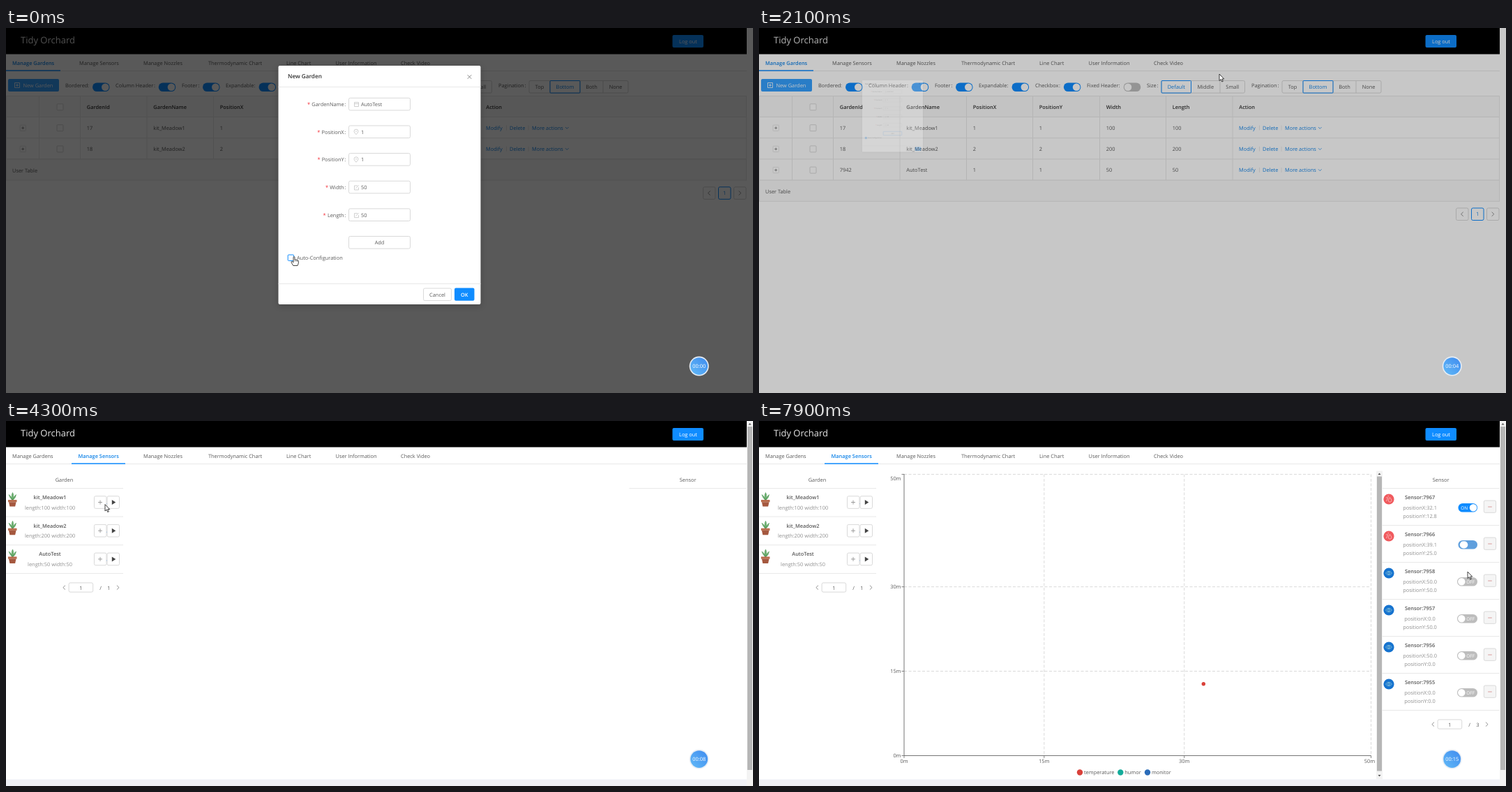
An HTML page for the animation above (8 s loop, 1071 by 523 pixels).

```html
<!DOCTYPE html>
<html lang="en">
<head>
<meta charset="utf-8">
<title>Garden console</title>
<style>
html, body { margin: 0; width: 100%; height: 100%; overflow: hidden; background: #fff; }
svg { display: block; width: 100vw; height: 100vh; }
text { font-family: 'Open Sans', 'Noto Sans', sans-serif; font-size: 7.4px; fill: #5a5a5a; white-space: pre; text-rendering: geometricPrecision; }
.b { font-weight: 600; }
.dark { fill: #333; }
.dim { fill: #8f8f8f; }
.blue { fill: #1284e8; }
.white { fill: #fff; }
.red { fill: #f5222d; }
.mid { text-anchor: middle; }
.end { text-anchor: end; }
</style>
</head>
<body>
<svg id="stage" viewBox="0 0 1071 523" preserveAspectRatio="none"></svg>
<script>
const LOOP = 8000, STEP = 100;
const BLUE = '#0f8cff', LINE = '#e8e8e8', EDGE = '#d9d9d9', HEAD = '#fafafa';
const GARDENS = [['17', 'kit_Meadow1', 1, 100], ['18', 'kit_Meadow2', 2, 200], ['7942', 'AutoTest', 1, 50]];

// markup helpers
const text = (x, y, s, cls = '', more = '') => `<text x="${x}" y="${y}" class="${cls}" ${more}>${s}</text>`;
const rect = (x, y, w, h, fill, stroke = 'none', r = 0, more = '') =>
  `<rect x="${x}" y="${y}" width="${w}" height="${h}" rx="${r}" fill="${fill}" stroke="${stroke}" ${more}/>`;
const path = (d, stroke, w = 0.8, fill = 'none', more = '') =>
  `<path d="${d}" stroke="${stroke}" stroke-width="${w}" fill="${fill}" ${more}/>`;
const hline = (x, y, x2, c = LINE) => path(`M${x} ${y}H${x2}`, c, 1);
const vline = (x, y, y2, c = LINE) => path(`M${x} ${y}V${y2}`, c, 1);
const disc = (x, y, r, fill, more = '') => `<circle cx="${x}" cy="${y}" r="${r}" fill="${fill}" ${more}/>`;
const box = (x, y, w, h, c = EDGE, r = 2, fill = '#fff') => rect(x, y, w, h, fill, c, r);
const group = (id, s, more = '') => `<g id="${id}" ${more}>${s}</g>`;
const at = (x, y, s) => `<g transform="translate(${x} ${y})">${s}</g>`;
const left = (x, y, c = '#777') => path(`M${x + 1.7} ${y - 3}l-3.2 3l3.2 3`, c);
const right = (x, y, c = '#777') => path(`M${x - 1.7} ${y - 3}l3.2 3l-3.2 3`, c);

function toggle(x, y, on) {
  return rect(x, y, 24.6, 12.6, on ? BLUE : '#bdbdbd', 'none', 6.3) + disc(on ? x + 18.3 : x + 6.3, y + 6.3, 5.3, '#fff');
}

function header() {
  return rect(0, 0, 1062, 37.5, '#000') + text(21, 21.5, 'Tidy Orchard', '', 'style="font-size:13px;fill:#e6e6e6"') +
    rect(955.5, 10, 44.5, 18, BLUE, 'none', 2) + text(978, 22, 'Log out', 'mid white');
}

function tabs(active) {
  const names = ['Manage Gardens', 'Manage Sensors', 'Manage Nozzles', 'Thermodynamic Chart', 'Line Chart', 'User Information', 'Check Video'];
  const xs = [9, 105, 197, 290, 402, 472.5, 566];
  const ink = active ? [94, 77] : [0, 78];
  return hline(0, 61.5, 1062) + rect(ink[0], 60.3, ink[1], 1.5, BLUE) + names.map((n, i) => i === active
    ? text(i ? 103.5 : xs[i], 53, n, 'b blue')
    : text(xs[i], 53, n, '', `id="tab${active}${i}"`)).join('');
}

function scrollbar(x, top, bottom, thumb) {
  return rect(x, top, 9, bottom - top, '#f3f3f3') + rect(x + 1, top + 8, 7, thumb, '#b6b6b6') +
    path(`M${x + 2.5} ${top + 5.5}h4l-2 -2.4z`, 'none', 0, '#555');
}

function toolbar() {
  const labels = [['Bordered', 85, 117, 124], ['Column Header', 157, 212, 218.7], ['Footer', 252, 275.5, 282],
    ['Expandable', 315, 355.5, 362.5], ['Checkbox', 396, 430, 436.8], ['Fixed Header', 470, 515.5, 522.7],
    ['Size', 556, 570.5], ['Pagination', 706, 743.5]];
  let s = rect(3, 73, 73, 18, '#34a0ff', 'none', 2) + path('M12.5 78.5h7v7h-7zM16 80v4M14 82h4', '#fff') + text(24.5, 85, 'New Garden', 'white');
  for (const [name, x, colon, sw] of labels)
    s += text(x, 85, name) + text(colon, 85, ':') + (sw ? toggle(sw, 78.4, sw < 500) : '');
  const radios = (xs, names, pick) => {
    s += box(xs[0], 75.5, xs.at(-1) - xs[0], 17.6);
    names.forEach((n, i) => {
      if (i) s += vline(xs[i], 75.5, 93.1, EDGE);
      s += text((xs[i] + xs[i + 1]) / 2, 87.3, n, 'mid' + (i === pick ? ' blue' : ''));
    });
    s += box(xs[pick], 75.5, xs[pick + 1] - xs[pick], 17.6, BLUE, 1, 'none');
  };
  radios([577, 619.5, 661, 696.5], ['Default', 'Middle', 'Small'], 0);
  radios([750, 780, 823, 856, 892], ['Top', 'Bottom', 'Both', 'None'], 1);
  return s;
}

const COLS = [0.5, 47.5, 106.5, 202, 297.5, 392.5, 488.5, 583.5, 679, 1061.5];

function tableRow(g, i) {
  const y = 127.5 + i * 30.2, base = y + 18.3;
  const cells = [g[0], g[1], g[2], g[2], g[3], g[3]];
  return COLS.map(x => vline(x, y, y + 30.2)).join('') + hline(0, y + 30.2, 1062) +
    box(20, y + 11.5, 8.4, 8.4, LINE, 1) + path(`M22.3 ${y + 15.7}h3.8m-1.9 -1.9v3.8`, '#666', 0.7) +
    box(73, y + 11.2, 9, 9, EDGE, 1) +
    cells.map((c, k) => text(COLS[k + 2] + 9.3, base, c)).join('') +
    text(688, base, 'Modify', 'blue') + vline(717.5, y + 12, y + 19) + text(722, base, 'Delete', 'blue') +
    vline(749, y + 12, y + 19) + text(754, base, 'More actions', 'blue') + path(`M802 ${y + 14.5}l2.3 2.3l2.3 -2.3`, '#1284e8', 0.7);
}

function gardensPage() {
  const heads = ['GardenId', 'GardenName', 'PositionX', 'PositionY', 'Width', 'Length', 'Action'];
  const foot = rect(0.5, 187.9, 1061, 30.2, HEAD, LINE) + text(9, 206.5, 'User Table') +
    [999.5, 1021.5, 1043.5].map((x, i) => box(x, 227.8, 17.5, 17.5, i === 1 ? BLUE : EDGE)).join('') +
    left(1008, 236.5) + text(1030.2, 239.3, '1', 'mid blue') + right(1052.3, 236.5);
  return tabs(0) + toolbar() + rect(0.5, 97.5, 1061, 30, HEAD, LINE) + COLS.map(x => vline(x, 97.5, 127.5)).join('') +
    box(73, 108.8, 9, 9, EDGE, 1) + heads.map((h, i) => text(COLS[i + 2] + 9.3, 115.6, h, 'b dark')).join('') +
    tableRow(GARDENS[0], 0) + tableRow(GARDENS[1], 1) + group('newRow', tableRow(GARDENS[2], 2)) + group('foot', foot);
}

function pager(x, y, page, total, id) {
  return left(x, y) + box(x + 6.8, y - 6.7, 34.6, 13.2) + text(x + 24, y + 3.2, page, 'mid', `id="${id}"`) +
    text(x + 52.3, y + 3.2, '/', 'mid') + text(x + 64, y + 3.2, total, 'mid') + group(id + 'Next', right(x + 77.3, y));
}

function gardenItem(g, i) {
  const leaf = path('M6 10Q2 6 1 2Q5 4 6 10Q4 3 6.500 -1Q9 3 6.500 10Q8 4 11.500 2Q11 7 6.500 10z', '#4b8f52', 0.5, '#6bb26e');
  const pot = rect(0, 9.5, 12.5, 3.2, '#b96d4e') + path('M1 12.700h10.500l-1.400 6.300h-7.700z', 'none', 0, '#a5583f');
  return at(0, i * 40.7, at(3, 103.5, leaf + pot) + text(63, 112, g[1], 'b mid') +
    text(63, 126.6, `length:${g[3]} width:${g[3]}`, 'mid dim') +
    box(126.5, 107.7, 17.5, 17.6) + path('M132 116.500h6m-3 -3v6', '#888') + disc(144.5, 118.5, 0.6, '#6aa9ea') +
    rect(145, 107.7, 17.5, 17.6, '#fff', EDGE, 2, `id="play${i}"`) +
    path('M151.800 113l5.500 3.500l-5.500 3.500z', 'none', 0, '#444', `id="arrow${i}"`) + hline(0, 137, 168));
}

function chart() {
  const dash = 'stroke-dasharray="4 2.5"';
  const xs = [208, 408.8, 609.7, 877.5], ys = [479.5, 358.5, 237.6, 76.4], marks = ['0m', '15m', '30m', '50m'];
  let s = '';
  for (let i = 0; i < 4; i++) {
    if (i) s += path(`M208 ${ys[i]}H877.5M${xs[i]} 76.4V479.5`, '#d0d0d0', 0.8, 'none', dash);
    s += path(`M208 ${ys[i]}h-3.5M${xs[i]} 479.5v3.500`, '#666') +
      text(203.5, i === 3 ? 85.3 : ys[i] + 2.7, marks[i], 'end') + text(i === 3 ? 875.5 : xs[i], 489.8, marks[i], 'mid');
  }
  s += path('M208 76V479.500H877.500', '#666', 0.9);
  [['temperature', 460, '#d9413a'], ['humor', 518.3, '#13ab9a'], ['monitor', 557, '#2b6cb9']].forEach(([n, x, c]) => {
    s += disc(x, 503.5, 4.2, c) + text(x + 6, 505.6, n);
  });
  return s + scrollbar(885, 71.5, 513.5, 422) + path('M887.500 507h4l-2 2.400z', 'none', 0, '#555') +
    disc(208 + 32.1 / 50 * 669.5 - 0.5, 376.7, 2.7, '#d9413a', 'id="dot"');
}

const RING = [[25, 25], [32.1, 37.2], [10.9, 25], [17.9, 37.2], [17.9, 12.8], [39.1, 25], [32.1, 12.8]];
const SENSORS = [[7967, 'temp', RING[6]], [7966, 'temp', RING[5]]];
[[50, 50], [0, 50], [50, 0], [0, 0]].forEach((p, i) => SENSORS.push([7958 - i, 'eye', p]));
for (let i = 6; i >= 0; i--) SENSORS.push([7948 + i, 'wet', RING[i]]);
for (let i = 4; i >= 0; i--) SENSORS.push([7943 + i, 'temp', RING[i]]);

const ICONS = {
  temp: disc(0, 0, 7.6, '#f05a5e') + path('M1.500 -2.500Q5 2 3.500 3.300Q1.500 5 -.300 3.300Q-1.500 2 1.500 -2.500zM-3.500 3L-1 -3M-4 -2.200h1.600M-1.500 -4.500h1.500', '#ffd4d2', 0.7),
  eye: disc(0, 0, 7.6, '#1673cf') + path('M-4.500 0Q0 -5.500 4.500 0Q0 5.500 -4.500 0zM-1.500 0a1.500 1.500 0 1 0 3 0a1.500 1.500 0 1 0 -3 0', '#9fd3d8', 0.7),
  wet: disc(0, 0, 7.6, '#20a493') + path('M3.500 -3A4.500 4.500 0 1 0 3.500 3M1.500 -1.500a2 2 0 1 0 0 3', '#b6e6dd', 0.7)
};

function sensorSwitch(mode) {
  if (mode === 'off') return rect(1001, 118, 29, 12.6, '#bdbdbd', 'none', 6.3) + disc(1007.3, 124.3, 5.2, '#fff') +
    text(1014.3, 126.8, 'OFF', 'white', 'style="font-size:6.5px"');
  const on = mode === 'on';
  return rect(1002.5, 118, 27.5, 12.6, on ? BLUE : '#5f9fdd', 'none', 6.3) + (on
    ? disc(1024, 124.3, 5.2, '#fff') + text(1006.3, 126.8, 'ON', 'white', 'style="font-size:6.5px"')
    : rect(1004.8, 119.2, 11.5, 10.2, '#fff', 'none', 5.1));
}

function sensorItem([id, kind, [x, y]], i) {
  return at(0, i * 53, at(903, 112, ICONS[kind]) + text(947.5, 112, 'Sensor:' + id, 'b mid') +
    text(947.5, 126.6, 'positionX:' + x.toFixed(1), 'mid dim') + text(947.5, 138.8, 'positionY:' + y.toFixed(1), 'mid dim') +
    group('sw' + id, sensorSwitch('off')) + box(1039.3, 114, 17.3, 17.3, EDGE, 2, '#f5f5f5') +
    hline(1045.2, 123, 1050.8, '#d99a9a') + hline(893.5, 149.5, 1061.5));
}

function sensorsPage() {
  const lists = [0, 1, 2].map(p => group('list' + p, SENSORS.slice(p * 6, p * 6 + 6).map(sensorItem).join(''))).join('');
  return rect(0, 513.5, 1062, 9.5, '#eff1f7') + tabs(1) + text(83.5, 86.8, 'Garden', 'mid') + hline(0, 96.5, 168) +
    GARDENS.map(gardenItem).join('') + pager(83.3, 238.6, 1, 1, 'gardenPage') +
    text(977.7, 86.8, 'Sensor', 'mid') + hline(893.5, 96.5, 1061.5) +
    group('data', chart() + lists + pager(966.3, 434.6, 1, 3, 'sensorPage'));
}

function modal() {
  const fields = [['GardenName', 'AutoTest'], ['PositionX', 1], ['PositionY', 1], ['Width', 50], ['Length', 50]];
  const card = 'M499.500 106.500h6v6h-6zM499.500 108.500h6';
  const pin = 'M502 113q-3 -3 -3 -4.500a3 3 0 0 1 6 0q0 1.500 -3 4.500zM501 108.500h2';
  const pen = 'M504 107h-4.500v6h6v-3.500M501.500 110.800l4.300 -4.500';
  let s = rect(390.5, 54, 290, 342, '#fff', 'none', 2, 'style="filter:drop-shadow(0 2px 4px #0003)"') +
    text(404, 72.4, 'New Garden', 'b dark', 'style="font-size:8.2px"') + hline(390.5, 84.5, 680.5) + hline(390.5, 366.5, 680.5) +
    path('M661.700 67.200l5.600 5.600m0 -5.600l-5.600 5.600', '#8a8a8a', 1, 'none', 'id="close"');
  fields.forEach(([name, value], i) => {
    s += at(0, i * 39.65, text(484.6, 112, `<tspan class="red">*</tspan><tspan dx="2.2">${name}</tspan>`, 'end') + text(485.2, 112, ':') +
      box(491.5, 100.3, 88, 17.6) + path([card, pin, pin, pen, pen][i], '#c4c4c4', 0.8) + text(509, 112, value));
  });
  return s + rect(490.5, 297.5, 90, 19.6, 'none', '#b9dcff', 2.5, 'id="glow"') + rect(491.5, 298.5, 88, 17.6, '#fff', EDGE, 2, 'id="add"') + text(535.5, 310, 'Add', 'mid') +
    rect(404.2, 325, 8.4, 8.4, '#fff', BLUE, 1, 'id="check"') + path('M406.200 329.200l1.800 1.900l3 -3.700', '#fff', 1.2) +
    text(417, 332, 'Auto-Configuration') + box(598.5, 373, 40, 17.6) + text(618.5, 384.8, 'Cancel', 'mid') +
    rect(643, 372.6, 28.5, 18.2, BLUE, 'none', 2) + text(657.2, 384.8, 'OK', 'b mid white');
}

const arrow = path('M0 0V9.500L2.200 7.500L3.800 11L5.300 10.300L3.800 7H6.700z', '#111', 0.8, '#fff');
const hand = path('M-1 .8Q0 -.6 1 .8V4.500Q2 3.800 2.900 4.900Q4 4.300 4.700 5.400Q6.300 5 6.300 6.700V9.500L5 13H-1.200L-4 8.300Q-4.200 6.800 -2.600 7.100L-1 8.500z', '#222', 0.85, '#fff') +
  path('M1 4.500V7M2.900 5V7.300M4.700 5.500V7.500', '#333', 0.5);

const stage = document.getElementById('stage');
stage.innerHTML = `<defs><linearGradient id="sky" x1="0" y1="1" x2="1" y2="0"><stop offset="0" stop-color="#62baf7"/><stop offset="1" stop-color="#3f8bef"/></linearGradient></defs>` +
  rect(0, 0, 1071, 523, '#fff') + header() + group('gardens', gardensPage()) + group('sensors', sensorsPage()) +
  group('pageBar', scrollbar(1062, 0, 523, 503) + rect(1063, 500, 7, 23, '#f3f3f3', 'none', 0, 'id="barEnd"')) +
  rect(0, 0, 1071, 523, '#000', 'none', 0, 'id="mask"') + group('modal', modal()) +
  disc(993.7, 484.6, 14, '#e6edf5') + disc(993.7, 484.6, 12.4, 'url(#sky)') + text(993.7, 487.3, '', 'mid white', 'id="clock"') +
  group('cursor', group('arrowTip', arrow) + group('handTip', hand));

const $ = id => document.getElementById(id);
const show = (id, on) => $(id).setAttribute('display', on ? 'inline' : 'none');
const set = (id, name, value) => $(id).setAttribute(name, value);

// time, x, y, and whether the pointer rests on something clickable
const ROUTE = [[0, 413, 327.5, 1], [200, 413, 327.5], [700, 536, 305, 1], [900, 536, 305], [1800, 660, 66, 0], [2300, 660, 66],
  [3500, 128, 45, 1], [4100, 128, 45], [4500, 156, 194, 1], [5100, 156, 194], [5700, 1052, 433, 1], [6500, 1052, 433],
  [6700, 1010.5, 414.5], [6900, 966, 433, 1], [7200, 966, 433], [7500, 1018, 124, 1], [7600, 1018, 124],
  [7700, 1018, 174, 1], [7800, 1018, 174], [7900, 1016, 216], [8000, 1016, 227]];

function pointer(t) {
  const i = ROUTE.findLastIndex(k => k[0] <= t), a = ROUTE[i], b = ROUTE[i + 1];
  const p = (t - a[0]) / (b[0] - a[0]), e = p * p * (3 - 2 * p);
  return { x: a[1] + (b[1] - a[1]) * e, y: a[2] + (b[2] - a[2]) * e, hand: !!a[3] };
}

function render(t) {
  const added = t >= 900, sensors = t >= 4100, focus = t >= 800, close = t > 2000 ? (t - 2000) / 100 : 0;
  show('gardens', !sensors);
  show('sensors', sensors);
  show('newRow', added);
  set('foot', 'transform', `translate(0 ${added ? 30.2 : 0})`);
  set('tab01', 'class', t >= 3500 ? 'blue' : '');

  show('modal', close < 2);
  const k = 1 - 0.7 * Math.min(close, 1);
  set('modal', 'transform', `translate(44 84) scale(${k}) translate(-44 -84)`);
  set('modal', 'opacity', close ? 0.25 : 1);
  set('mask', 'opacity', Math.max(0, 0.65 - 0.43 * close) * (close < 2));
  set('check', 'fill', t >= 200 ? BLUE : '#fff');
  set('add', 'stroke', focus ? BLUE : EDGE);
  show('glow', focus);
  set('close', 'stroke', t >= 1800 ? '#333' : '#8a8a8a');
  show('pageBar', close >= 2);
  show('barEnd', sensors);

  show('data', t >= 4700);
  const played = t >= 4600 && t < 5800;
  set('play2', 'stroke', played ? BLUE : EDGE);
  set('arrow2', 'fill', played ? BLUE : '#444');
  const page = t < 5800 ? 0 : t < 6200 ? 1 : t < 7000 ? 2 : t < 7200 ? 1 : 0;
  for (let i = 0; i < 3; i++) show('list' + i, i === page);
  $('sensorPage').textContent = page + 1;
  set('sensorPageNext', 'opacity', page === 2 ? 0.35 : 1);
  $('sw7967').innerHTML = sensorSwitch(t >= 7600 ? 'on' : t >= 7500 ? 'busy' : 'off');
  $('sw7966').innerHTML = sensorSwitch(t >= 7800 ? 'busy' : 'off');
  show('dot', t >= 7600);

  $('clock').textContent = '00:' + String(Math.floor(t / 500)).padStart(2, '0');
  const c = pointer(t);
  set('cursor', 'transform', `translate(${c.x} ${c.y})`);
  show('handTip', c.hand);
  show('arrowTip', !c.hand);
}

function tick() {
  render(Math.floor(performance.now() % LOOP / STEP) * STEP);
  requestAnimationFrame(tick);
}
tick();
</script>
</body>
</html>
```
